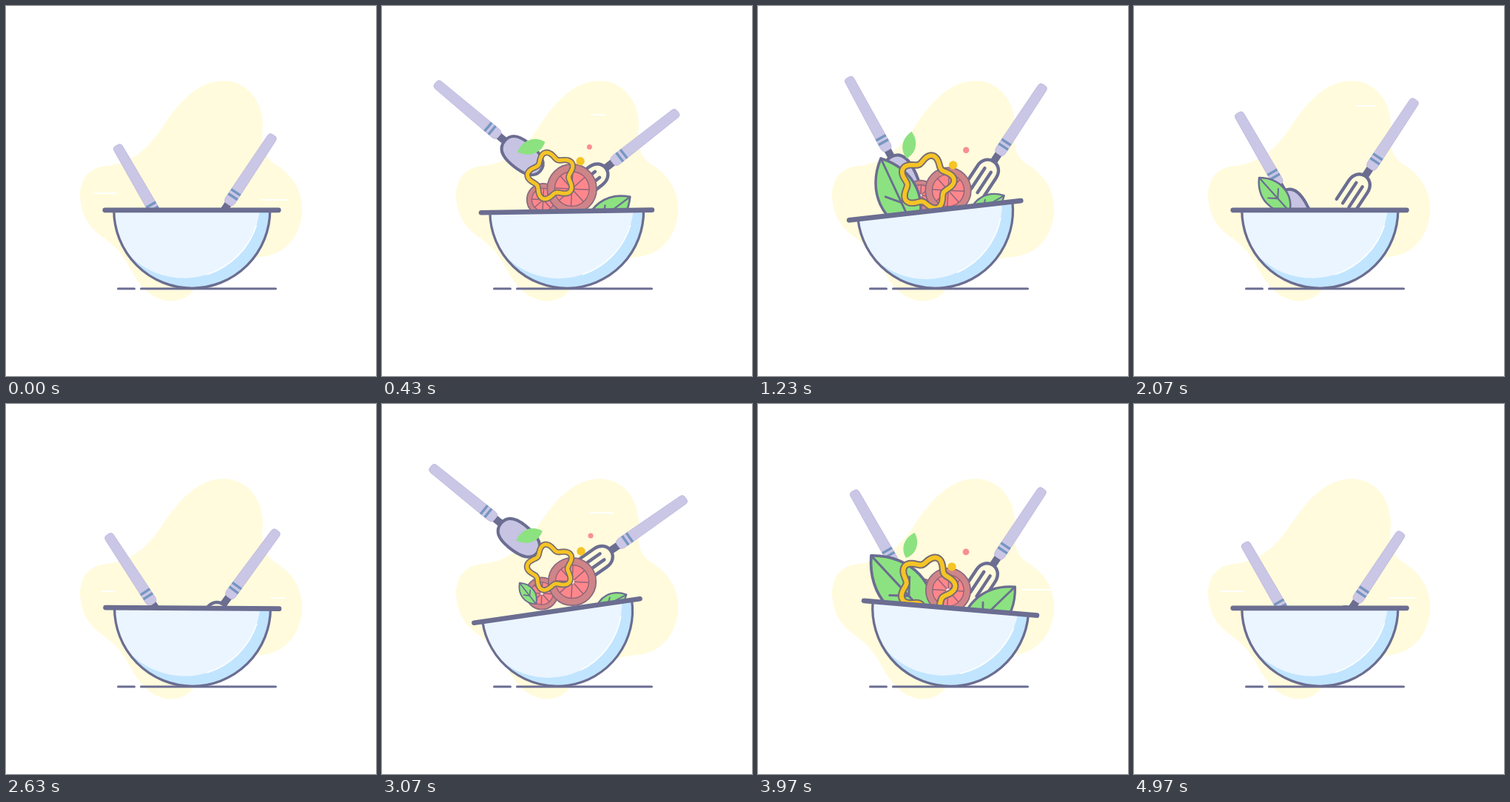
An HTML page with a canvas that plays this animation: 500x500 px, repeating every 5010 ms.

```html
<!DOCTYPE html>
<html lang="en">
<head>
<meta charset="utf-8">
<title>Salad toss</title>
<style>
html, body { margin: 0; width: 100%; height: 100%; overflow: hidden; background: #fff; }
canvas { display: block; width: 500px; height: 500px; }
</style>
</head>
<body>
<canvas id="stage" width="500" height="500"></canvas>
<script>
const ctx = document.getElementById('stage').getContext('2d');
const PERIOD = 2505;
const RAD = Math.PI / 180;
const INK = '#6b6d91', LILAC = '#cac6e6', GREEN = '#8ce280', YELLOW = '#f5c425';

// Key points: time, x, y, (length,) angle
const spoonPath = [[0, 151, 191, -30], [530, 67, 90, -52], [830, 105, 70, -26.5], [1465, 130, 120, -29.7], [2070, 142, 147, -30]];
const forkPath = [[0, 360, 177, 33.5], [565, 408, 129, 55], [680, 412, 110, 52], [830, 387, 99, 33.3], [1465, 384, 117, 33.5], [2070, 379, 129, 33.5]];
const leafPath = [
  [0, 195, 310, 36, 52], [400, 195, 310, 36, 52], [565, 186, 242, 36, 52], [830, 140, 198, 150, 45],
  [1230, 166, 206, 108, 65], [1465, 153, 205, 122, 47], [2070, 169, 232, 62, 48]
];
// Glints: middle x, y, length, time of full length
const glints = [[133, 253, 31, 2485], [362, 262, 35, 2485], [297, 147, 30, 565], [377, 251, 40, 1465], [314, 135, 25, 2070]];

const mix = (a, b, u) => a + (b - a) * u;
const ramp = (t, a, b) => Math.min(1, Math.max(0, (t - a) / (b - a)));
const smooth = (t, a, b) => { const u = ramp(t, a, b); return u * u * (3 - 2 * u); };
const bump = (t, mid, width) => Math.exp(-(((t - mid) / width) ** 2));

// Smooth periodic interpolation without overshoot
function pose(rows, t) {
  const n = rows.length;
  const at = (i, c) => rows[(i + n) % n][c] + (c ? 0 : Math.floor(i / n) * PERIOD);
  const slope = (i, c) => (at(i + 1, c) - at(i, c)) / (at(i + 1, 0) - at(i, 0));
  const tangent = (i, c) => {
    const a = slope(i - 1, c), b = slope(i, c);
    return a * b <= 0 ? 0 : 2 * a * b / (a + b);
  };
  let i = n - 1;
  while (rows[i][0] > t) i--;
  const span = at(i + 1, 0) - at(i, 0), u = (t - at(i, 0)) / span, v = 1 - u;
  return rows[0].slice(1).map((_, k) => {
    const c = k + 1;
    return v * v * (1 + 2 * u) * at(i, c) + u * u * (3 - 2 * u) * at(i + 1, c)
      + span * u * v * (v * tangent(i, c) - u * tangent(i + 1, c));
  });
}

// Bowl angle: a fading swing
function tilt(t) {
  const swing = mix(8.3, 6.5, smooth(t, 565, 830)) * smooth(t, 0, 450) * (1 - smooth(t, 1480, 2040));
  return -swing * Math.cos(2 * Math.PI * (t - 580) / 640);
}

// How far the food has sunk into the bowl
const sunk = t => 1 - smooth(t, 120, 500) + smooth(t, 1480, 1880);

// Food pops up, hovers, shrinks briefly, drifts by (dx, dy), then sinks
function toss(t, x, y, size, { dx = 0, dy = 0, grow = 0, pinch = 0 }) {
  const s = smooth(t, 650, 1500), h = sunk(t);
  return [
    mix(x + dx * s, 250, h * .6),
    mix(y + dy * s, 322, h),
    size * (1 + grow * s - pinch * bump(t, 830, 200))
  ];
}

function place(x, y, deg, draw) {
  ctx.save();
  ctx.translate(x, y);
  ctx.rotate(deg * RAD);
  draw();
  ctx.restore();
}

function fill(color) { ctx.fillStyle = color; ctx.fill(); }
function stroke(color, width) { ctx.strokeStyle = color; ctx.lineWidth = width; ctx.stroke(); }

function line(x1, y1, x2, y2, color, width) {
  ctx.beginPath();
  ctx.moveTo(x1, y1);
  ctx.lineTo(x2, y2);
  stroke(color, width);
}

function disc(x, y, r, color) {
  ctx.beginPath();
  ctx.arc(x, y, r, 0, 7);
  fill(color);
}

function blob() {
  ctx.beginPath();
  ctx.moveTo(294, 101);
  ctx.bezierCurveTo(325, 101, 347, 128, 347, 161);
  ctx.bezierCurveTo(345, 187, 347, 201, 361, 212);
  ctx.bezierCurveTo(385, 227, 400, 245, 400, 276);
  ctx.bezierCurveTo(399, 310, 378, 336, 345, 339);
  ctx.bezierCurveTo(305, 343, 275, 357, 254, 383);
  ctx.bezierCurveTo(245, 396, 230, 400, 216, 398);
  ctx.bezierCurveTo(193, 394, 180, 376, 169, 357);
  ctx.bezierCurveTo(156, 331, 144, 322, 129, 311);
  ctx.bezierCurveTo(110, 297, 101, 279, 100, 255);
  ctx.bezierCurveTo(101, 230, 116, 217, 138, 216);
  ctx.bezierCurveTo(175, 211, 195, 188, 212, 163);
  ctx.bezierCurveTo(236, 127, 260, 102, 294, 101);
  fill('#fffbdc');
}

function drawGlints(t) {
  const life = 460;
  for (const [x, y, len, peak] of glints) {
    const d = (t - peak + PERIOD * 1.5) % PERIOD - PERIOD / 2;
    if (Math.abs(d) >= life / 2) continue;
    const half = len / 2 * Math.cos(Math.PI * d / life), mid = x + d * .04;
    line(mid - half, y, mid + half, y, '#fff', 2.2);
  }
}

function handle() {
  ctx.fillStyle = INK;
  ctx.fillRect(-5, 104, 10, 16);
  ctx.beginPath();
  ctx.moveTo(-6.5, 1);
  ctx.quadraticCurveTo(-6, -3, -2, -3);
  ctx.lineTo(2, -3);
  ctx.quadraticCurveTo(6, -3, 6.5, 1);
  ctx.lineTo(7.5, 103);
  ctx.quadraticCurveTo(7, 109, 3, 109);
  ctx.lineTo(-3, 109);
  ctx.quadraticCurveTo(-7, 109, -7.5, 103);
  ctx.closePath();
  fill(LILAC);
  stroke('#c0b8de', .8);
  ctx.fillStyle = '#7596c0';
  for (const y of [88, 95]) ctx.fillRect(-7.5, y, 15, 3.4);
}

function spoon(x, y, deg) {
  place(x, y, deg, () => {
    ctx.beginPath();
    ctx.moveTo(0, 119);
    for (const s of [1, -1]) {
      const [top, end] = s > 0 ? [119, 182] : [182, 119];
      ctx.bezierCurveTo(s * 15, top, s * 18.5, mix(top, 147, .5), s * 18.5, 147);
      ctx.bezierCurveTo(s * 18.5, mix(end, 147, .5), s * 15, end, 0, end);
    }
    fill('#c7c3e3');
    stroke(INK, 4);
    handle();
  });
}

function fork(x, y, deg) {
  place(x, y, deg, () => {
    ctx.beginPath();
    ctx.moveTo(-15, 168);
    ctx.lineTo(-15, 138);
    ctx.bezierCurveTo(-15, 115, 15, 115, 15, 138);
    ctx.lineTo(15, 168);
    stroke(INK, 4.4);
    for (const s of [-5, 5]) line(s, 135, s, 168, INK, 4.4);
    handle();
  });
}

function leafShape(len, ratio) {
  const w = len * ratio * 1.33;
  ctx.beginPath();
  ctx.moveTo(0, 0);
  ctx.bezierCurveTo(len * .3, w, len * .75, w, len, 0);
  ctx.bezierCurveTo(len * .75, -w, len * .3, -w, 0, 0);
  ctx.closePath();
}

function leaf(x, y, len, deg) {
  place(x, y, deg, () => {
    const w = len * .021 + 1.2;
    leafShape(len, .25);
    fill(GREEN);
    stroke(INK, w);
    line(0, 0, len * .95, 0, INK, w * .85);
    for (const s of [-1, 1]) line(len * .61, 0, len * .46, s * len * .15, INK, w * .85);
  });
}

function looseLeaf(x, y, len, deg) {
  place(x, y, deg, () => {
    ctx.translate(-len / 2, 0);
    leafShape(len, .24);
    fill(GREEN);
  });
}

function tomato(x, y, r) {
  place(x, y, 0, () => {
    disc(0, 0, r, '#cf8588');
    stroke('#8b6a80', 1.8);
    disc(0, 0, r * .7, '#ff878b');
    stroke('#93647a', 1.4);
    for (let a = 3; a < 360; a += 45) {
      line(0, 0, r * .68 * Math.cos(a * RAD), r * .68 * Math.sin(a * RAD), '#93647a', 1.5);
    }
    disc(0, 0, r * .09, '#fff0e8');
  });
}

function pepper(x, y, size, deg) {
  place(x, y, deg, () => {
    ctx.beginPath();
    for (let a = 0; a < 360; a += 4) {
      const r = 28 * size * (1 + .17 * Math.cos(5 * a * RAD));
      ctx.lineTo(r * Math.cos(a * RAD), r * Math.sin(a * RAD));
    }
    ctx.closePath();
    stroke('#776b70', 8.4 * size);
    stroke(YELLOW, 5 * size);
  });
}

function bowl(t) {
  const r = 105.5, deg = tilt(t), size = 1 - .052 * bump(t, 760, 300);
  // Rolls on the ground without slipping
  place(251.3 + deg * RAD * r * size, 381.3 - r * size, deg, () => {
    ctx.scale(size, size);
    ctx.beginPath();
    ctx.arc(0, 0, r, 0, Math.PI);
    ctx.closePath();
    fill('#c1e5ff');
    ctx.save();
    ctx.clip();
    disc(-11, -11, 103, '#ebf5ff');
    ctx.beginPath();
    ctx.arc(-11, -11, 103, 18 * RAD, 72 * RAD);
    stroke('#fff', 1.6);
    ctx.restore();
    ctx.beginPath();
    ctx.arc(0, 0, r, 0, Math.PI);
    stroke(INK, 3.3);
    line(-117.5, 0, 117, 0, INK, 6.8);
  });
}

function rightLeaf(t) {
  const a = tilt(t);
  const [x, y, len] = toss(t, 341 + 1.3 * a, 251 - .8 * a, 80 + 4 * a, {});
  leaf(x, y, mix(len, 45, sunk(t)), 142 - 1.2 * a);
}

function frame(now) {
  const t = now % PERIOD, hover = ramp(t, 565, 1465);
  ctx.fillStyle = '#fff';
  ctx.fillRect(0, 0, 500, 500);
  ctx.lineCap = ctx.lineJoin = 'round';
  blob();
  drawGlints(t);
  line(151.5, 382, 173.5, 382, INK, 3);
  line(182.5, 382, 364.5, 382, INK, 3);
  spoon(...pose(spoonPath, t));
  fork(...pose(forkPath, t));
  rightLeaf(t);
  tomato(...toss(t, 216, 256, 22, { dx: 5, grow: -.1, pinch: .1 }));
  leaf(...pose(leafPath, t));
  tomato(...toss(t, 257, 240, 33.5, { dy: 12, grow: -.1, pinch: .22 }));
  disc(...toss(t, 282, 178, 3.5, { dx: -1, dy: 22, grow: .25 }), '#f98f92');
  disc(...toss(t, 269, 199, 5.7, { dx: -7, dy: 21 }), YELLOW);
  pepper(...toss(t, 228, 221, 1, { dy: 23, grow: .18, pinch: .11 }), mix(-105, -68, hover));
  looseLeaf(...toss(t, 199, 178, 40, { dx: 7, dy: 13, grow: -.1, pinch: .32 }), mix(-20, 109, 1 - (1 - hover) ** 2));
  bowl(t);
}

const start = performance.now();
function tick() {
  frame(performance.now() - start);
  requestAnimationFrame(tick);
}
tick();
</script>
</body>
</html>
```
